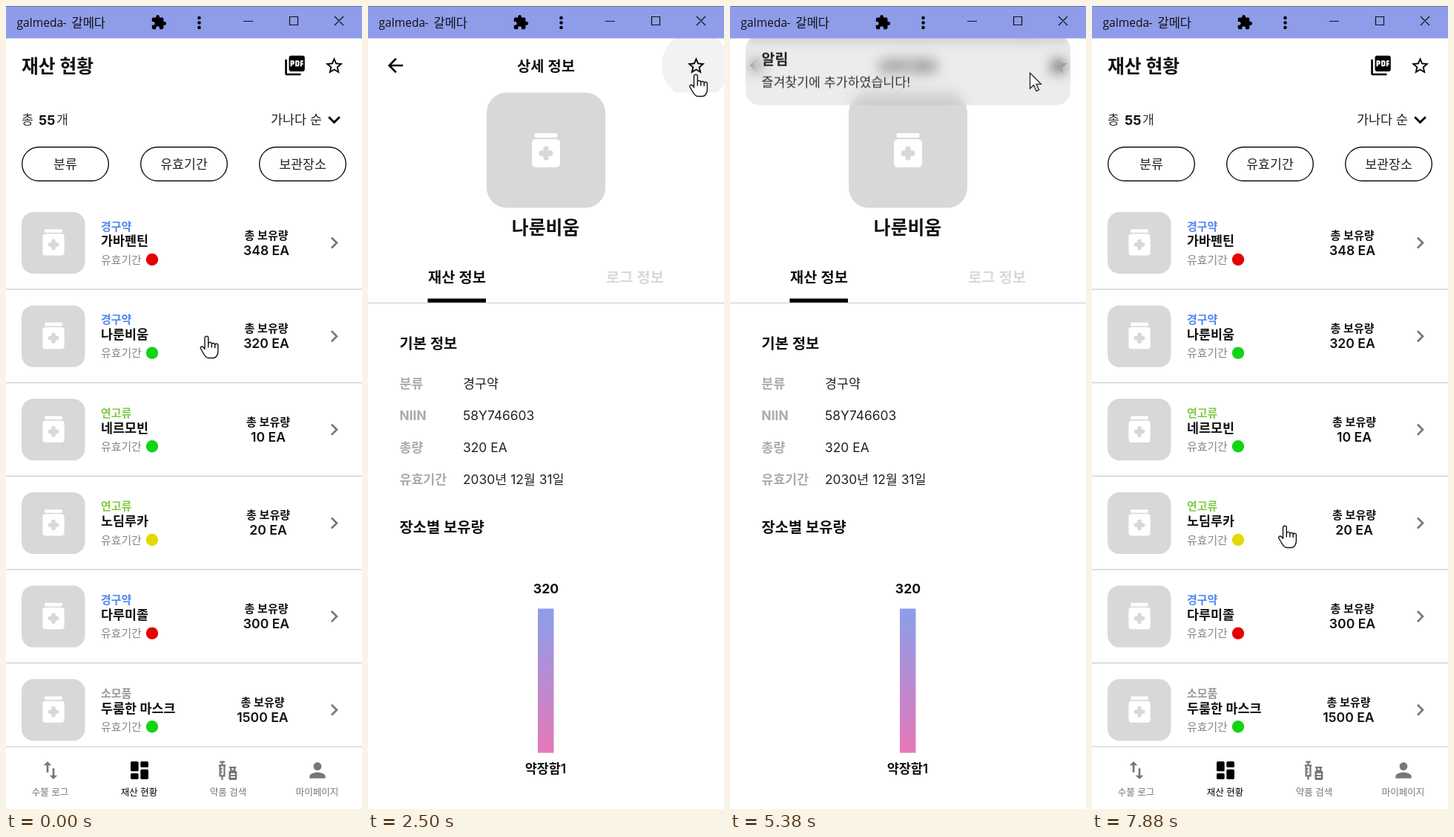
Write an HTML page that moves like this. It is 480x1080 px and loops after 8 s.

```html
<!DOCTYPE html>
<html lang="ko">
<head>
<meta charset="utf-8">
<title>재산 현황</title>
<style>
  html, body { margin: 0; width: 100%; height: 100%; overflow: hidden; background: #fff; }
  #stage { position: relative; width: 480px; height: 1080px; overflow: hidden; background: #fff; }
  #stage > * { position: absolute; left: 0; top: 0; }
  svg { display: block; overflow: visible; }
  text { font-family: Inter, 'Noto Sans CJK KR', 'Noto Sans CJK', 'Noto Sans CJK JP', sans-serif; white-space: pre; }
  #bar text { font-family: 'Open Sans', 'Noto Sans CJK KR', 'Noto Sans CJK', sans-serif; }
  #list, #detail { transform-origin: 240px 561.5px; }
  #scrim { width: 480px; height: 1080px; background: #000; }
  #snack {
    left: 21px; top: 65px; width: 438px; height: 95px; border-radius: 20px;
    background: rgba(158, 158, 158, .2); backdrop-filter: blur(9px);
  }
</style>
</head>
<body>
<div id="stage">
  <svg id="list" width="480" height="1080"></svg>
  <div id="scrim"></div>
  <svg id="detail" width="480" height="1080"></svg>
  <div id="snack"></div>
  <svg id="bar" width="480" height="44"></svg>
  <svg id="cursor" width="32" height="32"></svg>
</div>
<script>
const $ = id => document.getElementById(id);

const ICON = {
  star: 'M12 17.27L18.18 21l-1.64-7.03L22 9.24l-7.19-.61L12 2 9.19 8.63 2 9.24l5.46 4.73L5.82 21z',
  starLine: 'M22 9.24l-7.19-.62L12 2 9.19 8.63 2 9.24l5.46 4.73L5.82 21 12 17.27 18.18 21l-1.63-7.03L22 9.24zM12 15.4l-3.76 2.27 1-4.28-3.32-2.88 4.38-.38L12 6.1l1.71 4.04 4.38.38-3.32 2.88 1 4.28L12 15.4z',
  back: 'M20 11H7.83l5.59-5.59L12 4l-8 8 8 8 1.41-1.41L7.83 13H20v-2z',
  pdf: 'M20 2H8c-1.1 0-2 .9-2 2v12c0 1.1.9 2 2 2h12c1.1 0 2-.9 2-2V4c0-1.1-.9-2-2-2zm-8.5 7.5c0 .83-.67 1.5-1.5 1.5H9v2H7.5V7H10c.83 0 1.5.67 1.5 1.5v1zm5 2c0 .83-.67 1.5-1.5 1.5h-2.5V7H15c.83 0 1.5.67 1.5 1.5v3zm4-3H19v1h1.5V11H19v2h-1.5V7h3v1.5zM9 9.5h1v-1H9v1zM4 6H2v14c0 1.1.9 2 2 2h14v-2H4V6zm10 5.5h1v-3h-1v3z',
  right: 'M10 6L8.59 7.41 13.17 12l-4.58 4.59L10 18l6-6z',
  down: 'M16.59 8.59L12 13.17 7.41 8.59 6 10l6 6 6-6z',
  swap: 'M16 17.01V10h-2v7.01h-3L15 21l4-3.99h-3zM9 3L5 6.99h3V14h2V6.99h3L9 3z',
  person: 'M12 12c2.21 0 4-1.79 4-4s-1.79-4-4-4-4 1.79-4 4 1.79 4 4 4zm0 2c-2.67 0-8 1.34-8 4v2h16v-2c0-2.66-5.33-4-8-4z',
  puzzle: 'M20.5 11H19V7c0-1.1-.9-2-2-2h-4V3.5C13 2.12 11.88 1 10.5 1S8 2.12 8 3.5V5H4c-1.1 0-2 .9-2 2v3.8h1.5c1.49 0 2.7 1.21 2.7 2.7s-1.21 2.7-2.7 2.7H2V20c0 1.1.9 2 2 2h3.8v-1.5c0-1.49 1.21-2.7 2.7-2.7s2.7 1.21 2.7 2.7V22H17c1.1 0 2-.9 2-2v-4h1.5c1.38 0 2.5-1.12 2.5-2.5S21.88 11 20.5 11z'
};

// Text is placed by its vertical middle.
const text = (x, y, str, size, weight = 400, fill = '#111', anchor = 'start') =>
  `<text x="${x}" y="${y + size * .37}" font-size="${size}" font-weight="${weight}" fill="${fill}" text-anchor="${anchor}">${str}</text>`;
const mid = (x, y, str, size, weight, fill) => text(x, y, str, size, weight, fill, 'middle');
const rect = (x, y, w, h, fill, r = 0, extra = '') =>
  `<rect x="${x}" y="${y}" width="${w}" height="${h}" rx="${r}" fill="${fill}" ${extra}/>`;
const at = (x, y, scale, body) =>
  `<g transform="translate(${x} ${y}) scale(${scale})">${body}</g>`;
const icon = (name, x, y, scale, fill = '#000') =>
  at(x, y, scale, `<path transform="translate(-12 -12)" d="${ICON[name]}" fill="${fill}"/>`);
const jar = (x, y, scale) => at(x, y, scale,
  rect(-11.8, -20.8, 23.6, 4.6, '#fff', 1.2) + rect(-14.6, -14.6, 29.2, 29.2, '#fff', 4) +
  '<path d="M0-4.6V4.6M-4.6 0H4.6" stroke="#d8d8d8" stroke-width="5.6" stroke-linecap="round"/>');

const RED = '#e60000', GREEN = '#12d412', YELLOW = '#e2da00';
const KIND = { 경구약: '#4f86f3', 연고류: '#82cb45', 소모품: '#999' };
const ROWS = [
  ['경구약', '가바펜틴', RED, '348', 351],
  ['경구약', '나룬비움', GREEN, '320', 351],
  ['연고류', '네르모빈', GREEN, '10', 353.5],
  ['연고류', '노딤루카', YELLOW, '20', 353.5],
  ['경구약', '다루미졸', RED, '300', 351],
  ['소모품', '두룸한 마스크', GREEN, '1500', 346]
];
const ITEM = ROWS[1][1];

const row = ([kind, name, dot, count, cx], i) => at(0, i * 125.65, 1,
  rect(21, 277, 85.5, 83, '#d8d8d8', 16) + jar(64, 321, 1) +
  text(128, 296, kind, 15, 700, KIND[kind]) +
  text(128, 316, name, 17.4, 600) +
  text(128, 341.3, '유효기간', 14.9, 400, '#858585') +
  `<circle cx="197" cy="341" r="8.2" fill="${dot}"/>` +
  mid(cx, 308, '총 보유량', 15, 600) +
  mid(cx, 328, count + ' EA', 17.6, 600) +
  icon('right', 442.5, 318.5, 1.33, '#777') +
  rect(0, 380.4, 480, 1.3, '#cfcfcf'));

const pill = (x, label) =>
  rect(x + .7, 189.7, 116.6, 45.6, '#fff', 22.8, 'stroke="#111" stroke-width="1.4"') +
  mid(x + 59, 212.5, label, 17.3, 400, '#222');

const tiles = [[3, 3, 10], [3, 15, 6], [13, 3, 6], [13, 11, 10]]
  .map(([x, y, h]) => rect(x - 12, y - 12, 8, h, '#000', 1.2)).join('');
const vaccine =
  '<path transform="translate(-12 -12)" fill="none" stroke="#777" stroke-width="1.7" d="M3.5 3.5h5M6 3.5v3M2.5 7h7M3.8 7v10.5h4.4V7M6 17.5v4M4 10.5h2M4 13.8h2M13.2 9h7M14.8 9v3.5h3.8V9"/>' +
  rect(.7, .4, 8.2, 9.4, '#777', 1.3) + rect(2.6, 3, 4.4, 1.6, '#fff') + rect(2.6, 6, 4.4, 1.4, '#fff');

$('list').innerHTML =
  rect(0, 0, 480, 1080, '#fff') +
  text(21, 80.5, '재산 현황', 24.8, 700) +
  icon('pdf', 389.5, 80, 1.33) + icon('starLine', 442.5, 80.5, 1.15) +
  text(21, 153, '총', 17.3, 400, '#333') + text(44, 153, '55', 18, 700) + text(68, 153, '개', 17.3, 400, '#333') +
  text(357, 153, '가나다 순', 17.4, 400, '#222') + icon('down', 442.5, 153, 1.38) +
  pill(21, '분류') + pill(181, '유효기간') + pill(341, '보관장소') +
  ROWS.map(row).join('') +
  rect(0, 996, 480, 84, '#fff') + rect(0, 995.5, 480, 1.2, '#cfcfcf') +
  icon('swap', 60, 1028, 1.33, '#777') + at(180, 1028, 1.33, tiles) +
  at(299.5, 1028, 1.33, vaccine) + icon('person', 420, 1028, 1.33, '#777') +
  ['수불 로그', '재산 현황', '약품 검색', '마이페이지']
    .map((s, i) => mid(59.5 + i * 120, 1057, s, 12.5, 400, i === 1 ? '#000' : '#777')).join('');

const FACTS = [['분류', '경구약'], ['NIIN', '58Y746603'], ['총량', '320 EA'], ['유효기간', '2030년 12월 31일']];

$('detail').innerHTML =
  `<defs>
    <linearGradient id="fade" x2="0" y2="1"><stop stop-color="#8b9eeb"/><stop offset="1" stop-color="#e778b8"/></linearGradient>
    <clipPath id="head"><path d="M0 43h480v73.5H0z"/></clipPath>
  </defs>` +
  rect(0, 43, 480, 1037, '#fff') +
  `<g clip-path="url(#head)"><circle id="glowStar" cx="442" cy="80" r="46"/><circle id="glowBack" cx="37" cy="80" r="47"/></g>` +
  icon('back', 37, 80, 1.27) + mid(240, 80.5, '상세 정보', 19.8, 600) +
  `<g id="starOff">${icon('starLine', 442.5, 80.5, 1.15)}</g><g id="starOn">${icon('star', 442.5, 80.5, 1.15)}</g>` +
  rect(160, 116.5, 160, 155, '#d8d8d8', 27) + jar(240, 198, 1.3) +
  mid(239.5, 298, ITEM, 24.8, 700) +
  mid(120, 364.5, '재산 정보', 19.8, 600) + mid(360, 364.5, '로그 정보', 19.8, 600, '#d9d9d9') +
  rect(0, 398.8, 480, 1.3, '#d2d2d2') + rect(80.5, 393.5, 78.5, 5.3, '#000') +
  text(42.5, 454, '기본 정보', 19.8, 600) +
  FACTS.map(([k, v], i) =>
    text(42.5, 508 + i * 42.7, k, 17.3, 700, '#aaa') + text(128, 508 + i * 42.7, v, 17.4, 400, '#222')).join('') +
  text(42.5, 701, '장소별 보유량', 19.8, 600) +
  mid(240, 783.5, '320', 17.6, 700) +
  rect(229, 810.5, 21.5, 194, 'url(#fade)') +
  mid(239.5, 1025.5, '약장함1', 17.4, 600);

$('snack').innerHTML = '<svg width="438" height="95">' +
  text(21.5, 32.5, '알림', 19.6, 600, '#222') +
  text(21.5, 63.5, '즐겨찾기에 추가하였습니다!', 17.3, 400, '#333') + '</svg>';

$('bar').innerHTML =
  rect(0, 0, 480, 43.5, '#8f9ce9') + rect(0, 0, 480, 1, '#6771ad') +
  text(14.5, 22, 'galmeda', 15.6) + text(76.5, 22, '-', 15.6) + text(88.5, 22.5, '갈메다', 16.5, 300) +
  icon('puzzle', 206, 22, .92) +
  [16, 22.5, 29].map(y => `<circle cx="260.5" cy="${y}" r="2.3"/>`).join('') +
  '<path d="M320 20.5h13M382.5 14.5h11v11h-11zM443 14l12 12M455 14l-12 12" fill="none" stroke="#111" stroke-width="1.2"/>';

$('cursor').innerHTML =
  `<g id="hand" fill="#fff" stroke="#111" stroke-width="1.4" stroke-linejoin="round">
    <path d="M-2.5 2.5a2.4 2.4 0 0 1 4.8 0v7.5a2.3 2.3 0 0 1 4.5.8 2.3 2.3 0 0 1 4.4 1 2.2 2.2 0 0 1 4.2 1.4V20c0 5-2.5 9.5-7 9.5H3C-1 29.5-3 26-5 22l-3-5c-1-2.5 1.5-4 3.5-2l2 2.2z"/>
    <path d="M2.3 10v5.5M6.8 11v4.5M11.2 12v4" fill="none"/>
  </g>
  <path id="arrow" d="M0 0V21l5-4.6 3.6 8 3.4-1.5-3.5-7.8H15z" fill="#fff" stroke="#222" stroke-width="1.3"/>`;

const clamp = v => Math.min(1, Math.max(0, v));
const span = (t, a, b) => clamp((t - a) / (b - a));

function bezier(x1, y1, x2, y2) {
  const f = (a, b, s) => 3 * (1 - s) ** 2 * s * a + 3 * (1 - s) * s * s * b + s ** 3;
  return x => {
    let lo = 0, hi = 1;
    for (let i = 0; i < 24; i++) {
      const m = (lo + hi) / 2;
      if (f(x1, x2, m) < x) lo = m; else hi = m;
    }
    return f(y1, y2, lo);
  };
}
const easeA = bezier(.05, 0, .1333, .06), easeB = bezier(.2083, .82, .25, 1);
const zoom = p => p < 1 / 6 ? .4 * easeA(p * 6) : .4 + .6 * easeB((p - 1 / 6) * 1.2);
const outCirc = p => Math.sqrt(1 - (1 - p) ** 2);

const LOOP = 8000, STEP = 125;
const OPEN = 1259, CLOSE = 6340, PAGE = 300;
const TAP = 2750, HIDE = 4750;

const PATH = [
  [0, 270.5, 444], [1000, 270.5, 444], [1375, 263, 443], [1800, 263, 443], [2375, 442, 92],
  [2750, 442, 92], [3000, 434, 91], [4500, 433, 90], [5250, 433, 90], [6000, 48, 90],
  [6700, 48, 90], [7500, 260, 699], [8000, 260, 699]
];
function pointer(t) {
  const i = PATH.findIndex(k => k[0] > t);
  const [t0, x0, y0] = PATH[i - 1], [t1, x1, y1] = PATH[i];
  let p = span(t, t0, t1);
  p = p * p * (3 - 2 * p);
  return [x0 + (x1 - x0) * p, y0 + (y1 - y0) * p];
}
const show = (id, on) => { $(id).style.display = on ? '' : 'none'; };

function draw(t) {
  const open = span(t, OPEN, OPEN + PAGE), close = span(t, CLOSE, CLOSE + PAGE);
  const leaving = close > 0;
  const z = zoom(leaving ? close : open);
  const opacity = leaving ? 1 - span(close, .0825, .2075) : span(open, .125, .25);

  $('list').style.transform = `scale(${leaving ? 1.1 - .1 * z : 1 + .05 * z})`;
  $('detail').style.transform = `scale(${leaving ? 1 - .1 * z : .85 + .15 * z})`;
  $('detail').style.opacity = opacity;
  show('detail', opacity > 0);
  $('scrim').style.opacity = leaving ? 0 : .5 * span(open, .2075, .4175);

  const snack = outCirc(t < HIDE ? span(t, TAP, TAP + 1000) : 1 - span(t, HIDE, HIDE + 1000));
  $('snack').style.transform = `translateY(${-120 * (1 - snack)}px)`;
  show('snack', snack > 0);
  show('starOff', t < TAP);
  show('starOn', t >= TAP);

  const [x, y] = pointer(t);
  const onDetail = t > OPEN && t < CLOSE;
  const onStar = onDetail && t < 3000 && Math.hypot(x - 442, y - 80) < 46;
  const onBack = onDetail && Math.hypot(x - 37, y - 80) < 47;
  const hand = onDetail ? onStar || onBack : y > 255;
  $('glowStar').style.opacity = onStar ? (t < TAP ? .05 : .08) : 0;
  $('glowBack').style.opacity = onBack || leaving ? (t < 6250 ? .045 : .08) : 0;
  $('cursor').style.transform = `translate(${x}px, ${y}px)`;
  show('hand', hand);
  show('arrow', !hand);
}

function tick() {
  const t = performance.now() % LOOP;
  draw(Math.floor(t / STEP) * STEP);
  requestAnimationFrame(tick);
}
tick();
</script>
</body>
</html>
```
